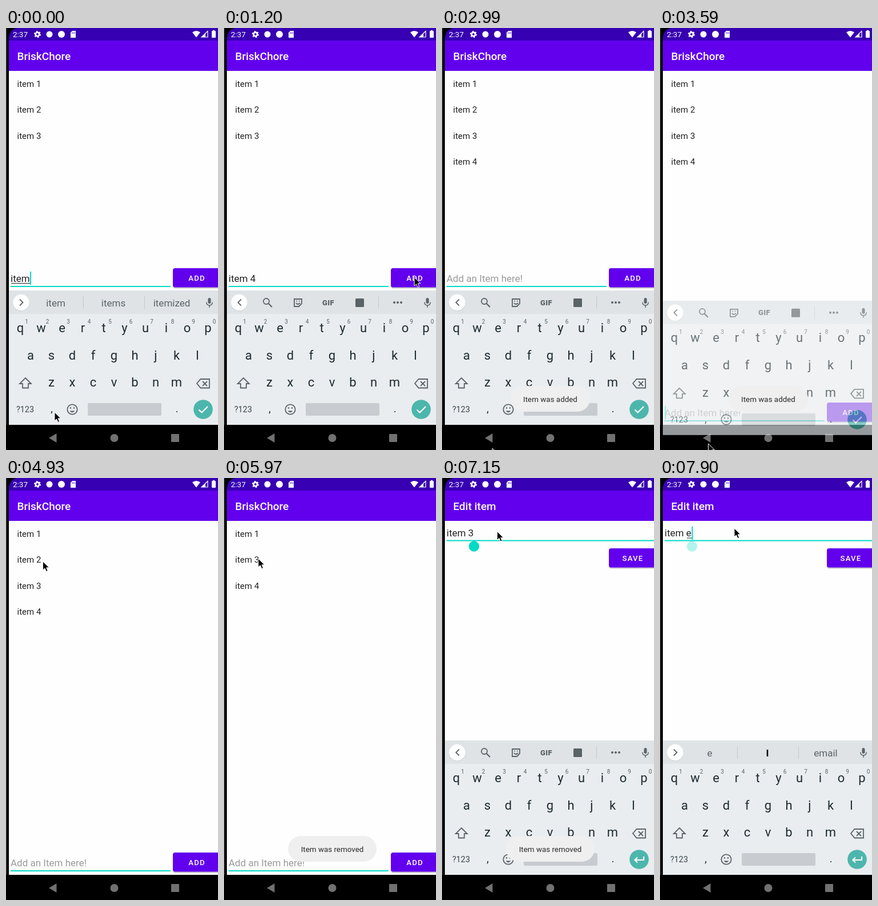
An HTML page that plays this animation: 371 px wide and 738 px high, repeating every 8 s.

```html
<!DOCTYPE html>
<html lang="en">
<head>
<meta charset="utf-8">
<title>To-do app</title>
<style>
  html, body { margin: 0; width: 100%; height: 100%; overflow: hidden; background: #000; }
  svg { display: block; width: 371px; height: 738px; font-family: Roboto, sans-serif; }
  .line { fill: none; stroke: #5a6367; stroke-width: 1.8; }
</style>
</head>
<body>
<svg id="stage" viewBox="0 0 371 738"></svg>
<script>
const LOOP = 8000, TICK = 149; // the screen refreshes once per tick
const TEAL = '#03dac5', PURPLE = '#6200ee', INK = '#222', GREY = '#5a6367';

const text = (x, y, s, size, fill = INK, more = '') =>
  `<text x="${x}" y="${y}" font-size="${size}" fill="${fill}" ${more}>${s}</text>`;
const mid = (x, y, s, size, fill, more = '') => text(x, y, s, size, fill, 'text-anchor="middle" ' + more);
const rect = (x, y, w, h, fill, more = '') =>
  `<rect x="${x}" y="${y}" width="${w}" height="${h}" fill="${fill}" ${more}/>`;
const dot = (x, y, r, fill, more = '') => `<circle cx="${x}" cy="${y}" r="${r}" fill="${fill}" ${more}/>`;
const path = (d, more = 'class="line"') => `<path d="${d}" ${more}/>`;
const group = (id, body, more = '') => `<g id="${id}" ${more}>${body}</g>`;

const page = title =>
  rect(5, 0, 367, 694, '#fefefe') + rect(5, 0, 367, 22, '#3700b3') +
  rect(5, 22, 367, 53, PURPLE) + text(19.5, 56, title, 19, '#fff', 'font-weight="500"');

const button = (y, label) =>
  rect(292, y + 1.5, 83, 34, '#000', 'rx="4" opacity=".22"') +
  rect(292, y, 83, 33.5, PURPLE, 'rx="4"') +
  mid(334, y + 22, label, 13.2, '#fff', 'font-weight="500" letter-spacing="1.2"');

const status = () => {
  let s = text(12, 15.8, '2:37', 13.5, '#fff');
  s += dot(55, 11, 3.3, 'none', 'stroke="#fff" stroke-width="2.8"');
  s += dot(55, 11, 5.2, 'none', 'stroke="#fff" stroke-width="1.8" stroke-dasharray="2.4 3.05"');
  s += dot(76, 11, 5.5, '#fff') + dot(97, 11, 6, '#fff');
  s += path('M116 5H122V17H113V8Z', 'fill="#fff"');
  s += path('M115.8 7.5v2.4M118 7.5v2.4M120.2 7.5v2.4', 'stroke="#3700b3"');
  s += path('M326 7.5Q333 2.5 340 7.5L333 16.5Z', 'fill="#fff"');
  s += path('M342 16L353 5.5V16Z', 'fill="none" stroke="#fff" stroke-width="1.2"');
  s += path('M342 16L349 9.5V16Z', 'fill="#fff"');
  return s + rect(360, 5, 7, 12, '#fff', 'rx="1"') + rect(362, 3.8, 3, 2, '#fff');
};

const nav = () =>
  rect(0, 694, 371, 44, '#000') + path('M75 717L88.5 709V725Z', 'fill="#717171"') +
  dot(189.5, 717, 7, '#717171') + rect(289, 710, 14, 14, '#717171', 'rx="1"');

const tools = () =>
  path('M30 474.5L24.5 480L30 485.5') +
  dot(74, 478, 5, 'none', 'class="line"') + path('M77.5 481.5L84 488', 'class="line" style="stroke-width:2.2"') +
  path('M123 474H136V482L131 487H123Z') + path('M126 481Q129 485 133 481M126.5 477.5h1.5M131 477.5h1.5') +
  mid(182.5, 484.5, 'GIF', 13, GREY, 'font-weight="900" letter-spacing=".4"') +
  rect(230, 473, 15, 15, GREY, 'rx="1.5"') + rect(270, 469, 1, 22, '#c3c8cb') +
  [298, 304, 310].map(x => dot(x, 480, 2, GREY)).join('');

const words = () =>
  path('M24 474.5L29.5 480L24 485.5') + rect(135, 469, 1, 22, '#c3c8cb') + rect(242, 469, 1, 22, '#c3c8cb') +
  [87, 188, 290].map((x, i) => mid(x, 486.5, '', 17, GREY, `id="word${i}"`)).join('');

const keyRow = (s, x, y) => [...s].map((c, i) => mid(x + 36.5 * i, y, c, 22, '#1d2a30')).join('');

const keyboard = () => {
  let s = rect(5, 459, 367, 42, '#dfe3e6') + rect(5, 500, 367, 194, '#e9edf0');
  s += dot(26.5, 480.5, 14.5, '#000', 'opacity=".12"') + dot(26.5, 480, 14.3, '#fff');
  s += group('tools', tools()) + group('words', words());
  s += rect(353.5, 472, 5, 10, GREY, 'rx="2.5"') + path('M350.8 479.5Q351 485 356 485T361.2 479.5M356 485V489', 'class="line" style="stroke-width:1.5"');
  s += keyRow('qwertyuiop', 25, 531.5) + keyRow('asdfghjkl', 43, 579.5) + keyRow('zxcvbnm', 79.5, 627);
  s += [...'1234567890'].map((c, i) => mid(36 + 36.5 * i, 517, c, 10, GREY)).join('');
  s += path('M34 612L44 622H39V629.5H29V622H24Z');
  s += path('M334 621.5L340.5 614H356V629.5H340.5ZM344 618L352 626M352 618L344 626');
  s += mid(33.5, 672, '?123', 14.4, '#3c474c') + mid(80, 672, ',', 18, INK) + mid(299, 672, '.', 18, INK);
  s += dot(116, 667, 8.7, 'none', 'class="line"') + dot(113, 664.5, 1.3, GREY) + dot(119, 664.5, 1.3, GREY);
  s += path('M111.5 669.5Q116 675 120.5 669.5Z', `fill="${GREY}"`);
  s += rect(143, 656, 129, 22, '#c8ccd0', 'rx="2"') + dot(345, 667, 16.8, '#4db6ac');
  const white = 'fill="none" stroke="#fff" stroke-width="2.2"';
  return s + path('M337.5 667.5L342.5 672.5L353 662', `id="done" ${white}`) +
    path('M353 662V668H338M342 663.5L337.5 668L342 672.5', `id="enter" ${white}`);
};

const caret = (id, y) => rect(0, y, 2, 23, TEAL, `id="${id}"`);

stage.innerHTML =
  rect(0, 0, 371, 738, '#000') + rect(0, 0, 1.5, 738, '#2c2c30') + nav() +
  group('list', page('BriskChore') +
    [0, 1, 2, 3].map(i => text(19.5, 103.3 + 45.1 * i, '', 15, INK, `id="row${i}"`)).join('') +
    group('adder', text(8, 444.3, '', 17, INK, 'id="entry"') + rect(9, 446, 33, 1, INK, 'id="mark"') +
      rect(8, 451, 280, 2, TEAL) + caret('caret', 426) + button(420, 'ADD'))) +
  group('edit', page('Edit item') +
    text(8, 102.3, '', 17, INK, 'id="field"') + rect(47, 104.5, 9, 1, INK, 'id="editMark"') +
    rect(8, 108.5, 363, 2, TEAL, 'id="rule"') + caret('editCaret', 85) +
    path('M56 109L62.5 113A9.2 9.2 0 1 1 49.5 113Z', `id="handle" fill="${TEAL}"`) + button(123, 'SAVE')) +
  path('M5 0H20Q7 2 5 17Z', 'fill="#000"') + status() +
  group('keys', keyboard()) +
  group('toast', rect(0, 626, 0, 45, '#efefef', 'id="pill" rx="22.5"') + mid(189.5, 653.8, '', 13.4, '#2a2a2a', 'id="note"')) +
  path('M0 0V15L3.5 11.8L6 17.5L8.6 16.4L6.2 10.8H11Z', 'id="mouse" stroke="#fff" stroke-width="1"');

const $ = id => document.getElementById(id);
const show = (id, v) => $(id).setAttribute('opacity', +v);
const say = (id, s) => { $(id).textContent = s; };
const set = (id, name, v) => $(id).setAttribute(name, v);

// Linear interpolation through [tick, value, ...] keys
function along(keys, n) {
  let i = keys.findIndex(k => k[0] > n);
  if (i < 0) return keys[keys.length - 1].slice(1);
  if (!i) return keys[0].slice(1);
  const a = keys[i - 1], b = keys[i], p = (n - a[0]) / (b[0] - a[0]);
  return a.slice(1).map((v, j) => v + (b[j + 1] - v) * p);
}

const POINTER = [[0, 85, 672], [3, 85, 672], [8, 333, 436], [10, 333, 436], [13, 240, 148], [15, 200, 168],
  [20, 88, 735], [23, 85, 727], [24, 84.5, 727], [30, 64.5, 146], [36, 64.5, 146], [39, 60, 141],
  [43, 60, 141], [46, 88, 95], [48, 105, 92], [51, 130, 88]];
const KEYS = [[23, 1], [24, .65], [25, 0], [45, 0], [46, .69], [47, 1]];
const TOAST = [[10, 0], [11, .6], [12, 1], [24, 1], [25, 0], [37, 0], [38, 1], [49, 1], [50, .4], [51, 0]];
const ZOOM = [[42, .95], [43, .994], [44, 1]];

function draw(n) {
  const blink = n < 3 || Math.floor((n - 33) / 3.36) & 1;
  const added = n >= 11, removed = n >= 37, editing = n >= 42, focused = n >= 46, typed = n >= 53;

  const rows = [1, 2, 3].concat(added ? 4 : []).filter(i => !(removed && i === 2));
  for (let i = 0; i < 4; i++) say('row' + i, rows[i] ? 'item ' + rows[i] : '');
  say('entry', added ? 'Add an Item here!' : n < 4 ? 'item' : 'item 4');
  set('entry', 'fill', added ? '#9a9a9a' : INK);
  show('mark', n < 3);
  show('caret', blink);
  set('caret', 'x', added ? 8.5 : n < 3 ? 42 : n < 4 ? 46 : 55.5);
  set('adder', 'transform', `translate(0 ${n < 24 ? 0 : 235})`);
  show('list', n < 43);

  const z = along(ZOOM, n)[0];
  show('edit', n < 42 ? 0 : n < 43 ? .9 : 1);
  set('edit', 'transform', `translate(191 369) scale(${z}) translate(-191 -369)`);
  say('field', typed ? 'item e' : 'item 3');
  show('editMark', typed);
  set('rule', 'fill', focused ? TEAL : '#858585');
  set('rule', 'height', focused ? 2 : 1);
  set('editCaret', 'x', 55.5);
  show('editCaret', focused && blink);
  show('handle', typed ? .3 : focused);

  const k = along(KEYS, n)[0];
  show('keys', k);
  set('keys', 'transform', `translate(0 ${51 * (1 - k)})`);
  const hints = n < 3 ? ['item', 'items', 'itemized'] : typed ? ['e', 'I', 'email'] : null;
  show('words', !!hints);
  show('tools', !hints);
  if (hints) hints.forEach((w, i) => say('word' + i, w));
  set('word1', 'fill', typed ? '#000' : GREY);
  set('word1', 'font-weight', typed ? 700 : 400);
  show('done', !editing);
  show('enter', editing);

  const w = removed ? 155 : 139;
  show('toast', along(TOAST, n)[0]);
  set('pill', 'x', 189.5 - w / 2);
  set('pill', 'width', w);
  say('note', removed ? 'Item was removed' : 'Item was added');

  set('mouse', 'transform', `translate(${along(POINTER, n)})`);
}

const start = performance.now();
function frame() {
  draw(Math.floor((performance.now() - start) % LOOP / TICK));
  requestAnimationFrame(frame);
}
frame();
</script>
</body>
</html>
```
